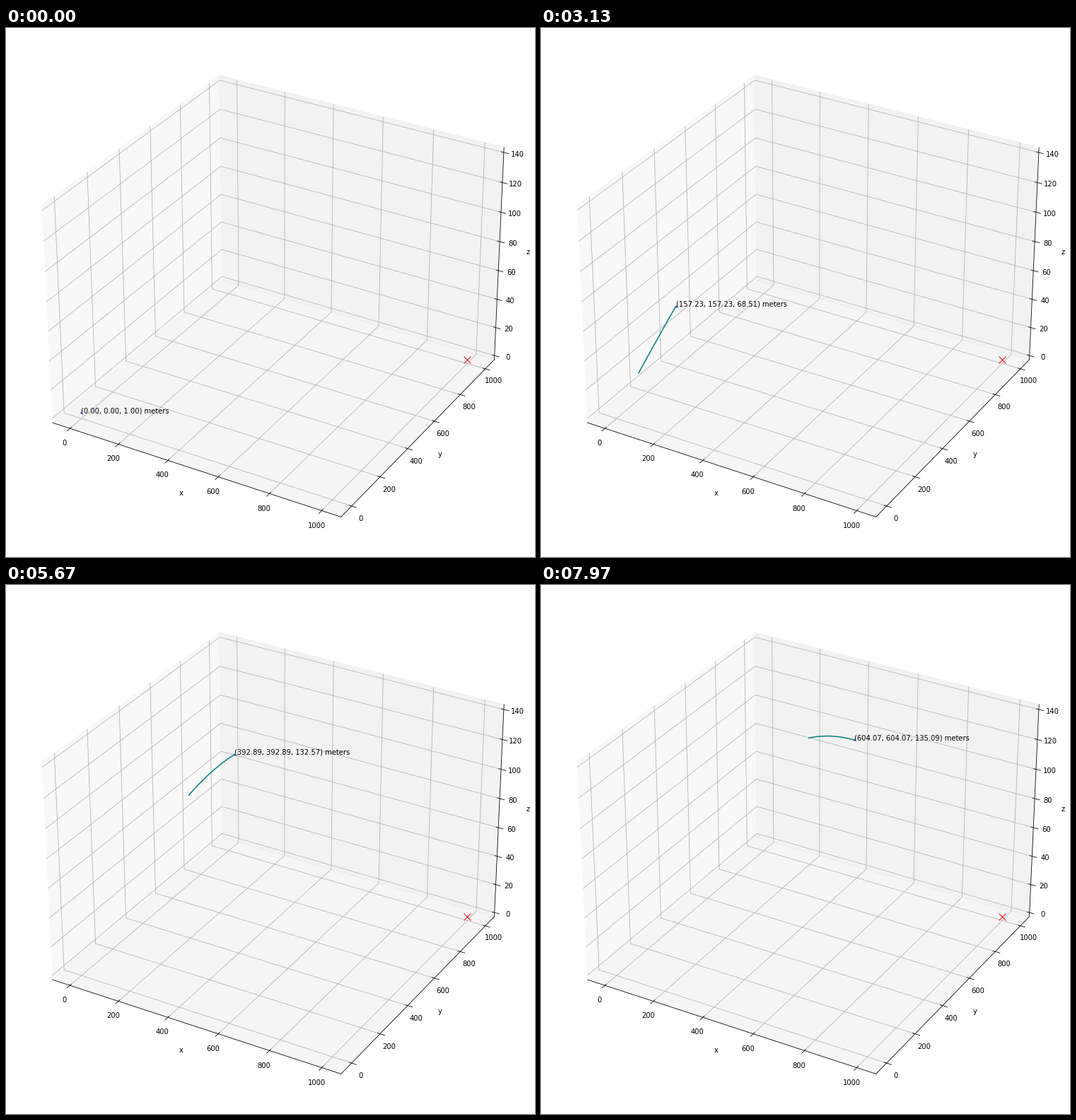
These frames come from a looping animation (748 by 748 pixels, 8000 ms). A matplotlib script:

```python
import numpy as np
import matplotlib.pyplot as plt
from matplotlib.animation import FuncAnimation

SIZE, DPI = 748, 72
FRAMES, LOOP = 240, 8000
PAD = 10.8 / SIZE
TRAIL = 37           # trail length in frames

# boost phase: thrust tapers linearly, then free flight
IGNITE, BURN = 2, 87.6
VX, VZ, HALF_G = 3.060552, 1.240486, 0.0054478
REF, X_REF, Z_REF = 94, 160.291, 69.76
COAST_START = REF - X_REF / VX - IGNITE
TAPER = 12 * VX * (BURN / 2 - COAST_START) / BURN ** 3
ACCEL = VX / BURN + TAPER * BURN / 2


def position(n):
    """Horizontal distance (same for x and y) and height at frame n."""
    n = np.asarray(n, dtype=float)
    tau = np.clip(n - IGNITE, 0, BURN)
    left = tau - BURN
    x_up = ACCEL * tau ** 2 / 2 - TAPER * tau ** 3 / 6
    slope = 0.43042 - 1.968e-4 * left - 6.314e-6 * left ** 2
    z_up = 1 + x_up * slope

    d = n - REF
    x_free = X_REF + VX * d
    z_free = Z_REF + VZ * d - HALF_G * d ** 2

    burning = n < IGNITE + BURN
    return np.where(burning, x_up, x_free), np.where(burning, z_up, z_free)


def padded(low, high):
    edge = (high - low) / 48
    return low - edge, high + edge


fig = plt.figure(figsize=(SIZE / DPI, SIZE / DPI), dpi=DPI, facecolor="white")
ax = fig.add_axes([PAD, PAD, 1 - 2 * PAD, 1 - 2 * PAD], projection="3d")
ax.view_init(elev=30, azim=-60)
ax.set_xlim(*padded(-50, 1050))
ax.set_ylim(*padded(-50, 1050))
ax.set_zlim(*padded(0, 140.37))
ax.set_xticks(range(0, 1001, 200))
ax.set_yticks(range(0, 1001, 200))
ax.set_zticks(range(0, 141, 20))
ax.set_xlabel("x")
ax.set_ylabel("y")
ax.set_zlabel("z")
ax.set_autoscale_on(False)

ax.plot([1000], [1000], [0], "rx", markersize=10)
trail, = ax.plot([], [], [], color="teal", lw=1.5)
head, = ax.plot([0], [0], [1], "bo", markersize=2, markeredgewidth=0)
label = ax.text(0, 0, 1, "", color="black", fontsize=10)


def update(n):
    x, z = position(np.linspace(max(n - TRAIL, 0), n, 60 if n else 0))
    trail.set_data_3d(x, x, z)
    x, z = (float(v) for v in position(n))
    head.set_data_3d([x], [x], [z])
    label.set_position_3d((x, x, z))
    label.set_text(f"({x:.2f}, {x:.2f}, {z:.2f}) meters")
    return trail, head, label


anim = FuncAnimation(fig, update, frames=FRAMES, interval=LOOP / FRAMES,
                     init_func=lambda: update(0), repeat=True,
                     repeat_delay=0, blit=False)
plt.show()
```
